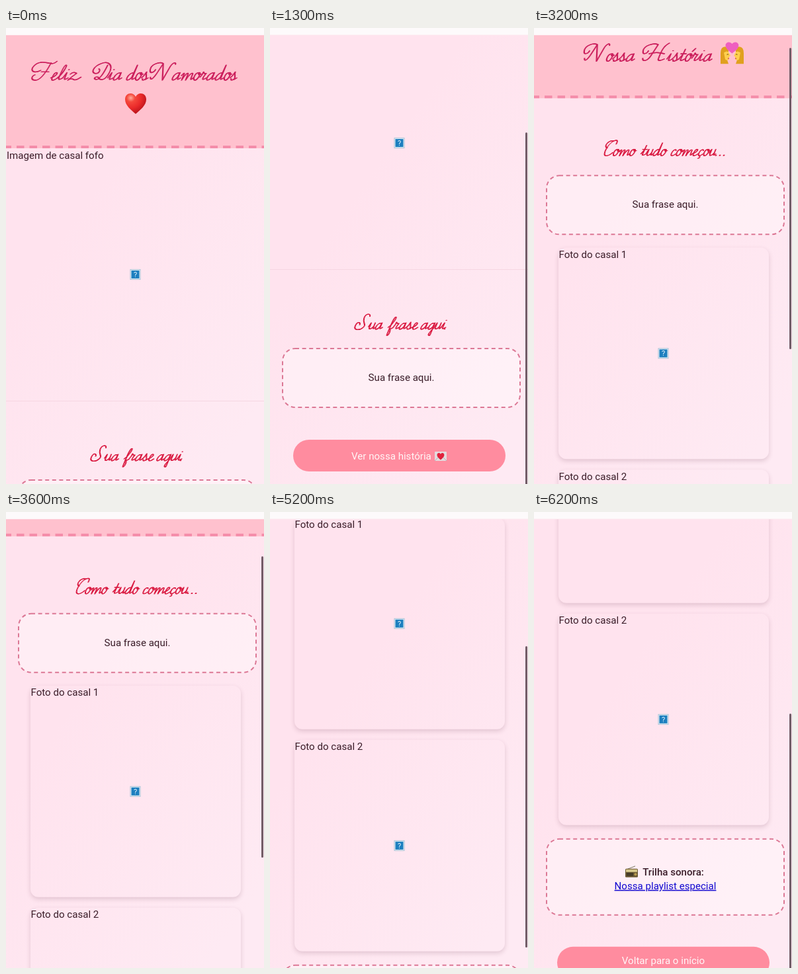
These frames come from a looping animation (390x690 px, 6300 ms). An HTML page:

```html
<!DOCTYPE html>
<html lang="pt-BR">
<head>
<meta charset="utf-8">
<title>Feliz Dia dos Namorados</title>
<style>
@property --s { syntax: '<number>'; inherits: true; initial-value: 0; }
html, body { margin: 0; width: 100%; height: 100%; overflow: hidden; }
body { position: relative; background: linear-gradient(125deg, #ffe3ee 35%, #feeaf3 90%); }
section { position: absolute; inset: 0; overflow: hidden; }
section > svg {
  position: absolute; left: 0; top: 0; overflow: visible;
  transform: translateY(calc(var(--s) * -1px));
}
.strip { position: absolute; left: 0; top: 0; width: 100%; height: 10px; background: #fdfafb; border-bottom: 1px solid #fdeef2; }
text { font: 15.1px Roboto, sans-serif; fill: #3a1d29; }
.mid { text-anchor: middle; }
.head { fill: #ffc1ce; }
.rule { stroke: #f48ca9; stroke-width: 4; stroke-dasharray: 11.5 8; stroke-dashoffset: 3.5; }
.card { fill: #fff; fill-opacity: .34; stroke: #dc7895; stroke-width: 2; stroke-dasharray: 6 4.6; }
.button { fill: #ff8c9f; }
.on-button { fill: #fff6f7; }
.link { fill: #1208d0; text-decoration: underline; }
.label { font-weight: 500; }
.photo { position: absolute; left: 37px; width: 318px; height: 320px; border-radius: 12px;
  box-shadow: 0 3px 7px rgba(110, 60, 85, .2);
  transform: translateY(calc(var(--s) * -1px)); }
.script { fill: none; stroke-width: 1.25; stroke-linecap: round; stroke-linejoin: round; }
.title { stroke: #cb1f5c; }
.phrase { stroke: #d9183f; }
.bar { position: absolute; left: 386px; width: 3px; border-radius: 2px; background: #705c66; }

#home { animation: home-scroll 6.3s infinite, home-show 6.3s step-end infinite; }
#home .bar { top: calc(12px + var(--s) * .733px); height: 625px; animation: home-bar 6.3s linear infinite; }
#story { animation: story-scroll 6.3s infinite, story-show 6.3s step-end infinite; }
#story .bar { top: calc(13px + var(--s) * .533px); animation: story-bar 6.3s linear infinite, bar-size 6.3s step-end infinite; }

@keyframes home-scroll {
  0% { --s: 0; animation-timing-function: cubic-bezier(.4, .16, .7, .68); }
  11.111% { --s: 102; animation-timing-function: cubic-bezier(.3, .32, .65, .9); }
  20.635% { --s: 199; animation-timing-function: linear; }
  22.222%, 100% { --s: 200; }
}
@keyframes story-scroll {
  0%, 46.032% { --s: 0; animation-timing-function: cubic-bezier(.4, .16, .7, .68); }
  57.143% { --s: 102; animation-timing-function: cubic-bezier(.3, .32, .65, .9); }
  66.667%, 69.841% { --s: 200; animation-timing-function: linear; }
  82.54% { --s: 356; animation-timing-function: linear; }
  98.413% { --s: 547; animation-timing-function: linear; }
  100% { --s: 566; }
}
@keyframes home-show { 0% { visibility: visible; } 30.15%, 100% { visibility: hidden; } }
@keyframes story-show { 0% { visibility: hidden; } 30.15%, 100% { visibility: visible; } }
@keyframes home-bar { 0%, .8% { opacity: 0; } 3%, 23% { opacity: 1; } 27%, 100% { opacity: 0; } }
@keyframes story-bar {
  0%, 31% { opacity: 0; } 33.3%, 39.7% { opacity: 1; }
  42.86%, 46% { opacity: 0; } 48.4%, 100% { opacity: 1; }
}
@keyframes bar-size { 0% { height: 403px; } 45%, 100% { height: 456px; } }
</style>
</head>
<body>
<svg width="0" height="0" style="position:absolute">
  <defs>
    <radialGradient id="red" cx=".27" cy=".22" r=".9">
      <stop offset="0" stop-color="#ffab98"/><stop offset=".22" stop-color="#f5483c"/>
      <stop offset=".55" stop-color="#ea2a2a"/><stop offset="1" stop-color="#a80a16"/>
    </radialGradient>
    <path id="heart" d="M16 31C9 25 0 18 0 9C0-1 12-3 16 5C20-3 32-1 32 9C32 18 23 25 16 31Z"/>
    <g id="missing">
      <rect x="187.5" y="-8" width="16" height="16" fill="#a9c3d6"/>
      <rect x="188.5" y="-7" width="14" height="14" fill="#e4f0f7"/>
      <rect x="189.5" y="-6" width="12" height="12" fill="#1d7fbf"/>
      <text class="mid" x="195.5" y="4" style="font-size:11px;fill:#e8f6ff">?</text>
    </g>
    <g id="face">
      <path d="M0 34V18Q0 8 7 8Q12 9 12 15L10 28L12 34Z" fill="#e0a01e"/>
      <path d="M5 17Q11 13 13 18L15 22L13 23V27Q10 30 7 27Z" fill="#ffd04d"/>
      <path d="M9.500 20q1.500-1.500 2.500 0" fill="none" stroke="#6b4212"/>
      <path d="M11 26l2-.5" stroke="#d0455c" stroke-width="1.500"/>
    </g>
  </defs>
</svg>

<section id="home">
  <svg width="390" height="900">
    <rect class="head" y="10" width="390" height="172"/>
    <path class="rule" d="M0 180H390"/>
    <g class="script title" data-y="79" data-k="1" data-words="Feliz 39 Dia 133 dos 180 Namorados 217"></g>
    <use href="#heart" x="180" y="99" fill="url(#red)"/>
    <text x="1" y="198.500">Imagem de casal fofo</text>
    <use href="#missing" y="373"/>
    <path d="M0 564.500H390" stroke="#f6d6e2"/>
    <g class="script phrase" data-y="655" data-k=".86" data-words="Sua 128 frase 177 aqui 226 . 262"></g>
    <rect class="card" x="19" y="684" width="359" height="89" rx="19"/>
    <text class="mid" x="198.500" y="733">Sua frase aqui.</text>
    <rect class="button" x="35" y="822" width="321" height="48" rx="24"/>
    <text class="on-button" x="123" y="852">Ver nossa história</text>
    <rect x="249" y="840" width="18" height="14" rx="1" fill="#e3dbde"/>
    <path d="M249 854l7-7M267 854l-7-7" stroke="#b9aeb3"/>
    <use href="#heart" transform="translate(252.500 842) scale(.34)" fill="#e0213c"/>
  </svg>
  <div class="bar"></div>
</section>

<section id="story">
  <div class="photo" style="top:365px"></div>
  <div class="photo" style="top:701px"></div>
  <svg width="390" height="1270">
    <rect class="head" y="10" width="390" height="129"/>
    <path class="rule" d="M0 137H390"/>
    <g class="script title" data-y="83" data-k="1" data-words="Nossa 75 História 163"></g>
    <g transform="translate(282 53)">
      <use href="#face"/>
      <use href="#face" transform="translate(35 0) scale(-1 1)"/>
      <use href="#heart" transform="translate(7.500 1) scale(.62 .55)" fill="#ef5fc0"/>
    </g>
    <g class="script phrase" data-y="226" data-k=".86" data-words="Como 102 tudo 160 começou 205 ... 273"></g>
    <rect class="card" x="19" y="256" width="359" height="89" rx="19"/>
    <text class="mid" x="198.500" y="305">Sua frase aqui.</text>
    <text x="37.500" y="380.500">Foto do casal 1</text>
    <use href="#missing" y="525"/>
    <text x="37.500" y="716.500">Foto do casal 2</text>
    <use href="#missing" y="861"/>
    <rect class="card" x="19" y="1042" width="359" height="115" rx="19"/>
    <g transform="translate(138 1083)">
      <path d="M2 5L15 0" stroke="#7d7660"/>
      <rect y="4" width="19" height="13" rx="1.500" fill="#6d5a34"/>
      <rect x="1" y="5" width="17" height="4" fill="#d8c98d"/>
      <rect x="2" y="10" width="10" height="5" fill="#463b27"/>
      <circle cx="15.500" cy="12.500" r="2" fill="#b99c50"/>
    </g>
    <text class="mid label" x="210.500" y="1097">Trilha sonora:</text>
    <text class="mid link" x="198.500" y="1118">Nossa playlist especial</text>
    <rect class="button" x="35" y="1205" width="321" height="48" rx="24"/>
    <text class="mid on-button" x="195.500" y="1231">Voltar para o início</text>
  </svg>
  <div class="bar"></div>
</section>
<div class="strip"></div>

<script>
// Pen strokes of the handwriting: advance, then path (baseline 0, x-height 10).
const bowl = 'M9-9C5-11 1-7 1-3S5 1 8-4';
const cee = 'M7-8C6-11 1-9 1-4S5 1 9-3';
const oh = 'M6-10C-1-10 0 0 4 0S10-10 6-10Q5-6 10-8';
const pen = {
  a: [13, bowl + 'L9-10V-3Q9 1 13-3'],
  c: [9, cee],
  ç: [9, cee + 'M4 0Q7 3 3 4'],
  d: [13, bowl + 'L9-20V-3Q9 1 13-3'],
  e: [10, 'M0-3C7-5 8-10 5-10S0 0 4 0Q7 0 10-3'],
  f: [9, 'M0-3C6-8 9-19 6-19S3-8 3 8C3 11 6 9 6 5Q6 0 3-1Q6 0 9-3'],
  i: [8, 'M0-3L3-10V-3Q3 1 8-3M4-14h.5'],
  l: [8, 'M0-3C5-8 8-20 5-20S2-8 2-3Q3 1 8-3'],
  m: [19, 'M0-6Q3-12 3-7V0C4-6 8-12 9-8V0C10-6 15-12 16-8V-3Q16 1 19-3'],
  o: [10, oh],
  ó: [10, oh + 'M7-13L10-17'],
  q: [11, bowl + 'L9-10V8C9 11 5 9 6 6Q8 1 11-3'],
  r: [10, 'M0-4Q2-7 2-11Q4-8 7-9Q5-5 5-3Q5 1 10-3'],
  s: [10, 'M0-3Q3-6 4-11C4-7 8-4 7-2S2 1 2-2M7-1L10-3'],
  t: [9, 'M0-3L4-10M4-16L3-3Q3 1 9-3M0-10H8'],
  u: [12, 'M0-4L2-10V-3C2 1 7 0 9-5V-10V-3Q9 1 12-3'],
  z: [18, 'M1-8Q4-12 10-9Q5-5 1 0Q5-3 9-1T19-4'],
  '.': [7, 'M1-1h.8v.6h-.8z'],
  F: [27, 'M18-23C16-8 12 0 5 0S-4-5 1-7M7-13C-2-8-10-13-6-19C-2-25 6-24 13-23S23-21 26-25M9-11H20'],
  D: [19, 'M11-20C10-8 7 0 2-1S-1-5 4-4C8 0 16 2 18-9S10-26 0-22S-10-10-3-9S3-14 0-15'],
  N: [32, 'M-1-4C1 1 4-2 6-8L10-22L19 0L22-16C23-23 28-25 29-21M10-22C3-25-8-21-6-14S2-11 2-14'],
  S: [22, 'M17-20C16-25 7-25 8-17S17-8 13-3S-3 2-2-6S5-10 5-7'],
  H: [36, 'M-1-4C1 1 8 0 10-8L14-22C6-25-7-21-5-14S3-11 3-14M30-24C21-19 23-8 23-3Q24 1 32-3M6-10Q16-13 29-10'],
  C: [18, 'M17-18C18-24 15-25 11-23C2-19-1 0 8 0Q13 0 17-5M4-12C-4-14 0-25 11-23']
};

function write(g) {
  const { y, k, words } = g.dataset;
  const parts = words.split(' ');
  const label = [];
  let out = '';
  for (let i = 0; i < parts.length; i += 2) {
    let x = +parts[i + 1];
    label.push(parts[i]);
    for (const ch of parts[i]) {
      const [advance, d] = pen[ch];
      // A second, shifted stroke thickens the downstrokes like a broad nib.
      for (const nib of [0, .9])
        out += `<path d="${d}" transform="translate(${x + nib} ${y}) scale(${k} ${k * 1.14}) skewX(-25)"/>`;
      x += advance * k;
    }
  }
  g.innerHTML = out;
  g.setAttribute('role', 'img');
  g.setAttribute('aria-label', label.join(' '));
}
document.querySelectorAll('.script').forEach(write);
</script>
</body>
</html>
```
